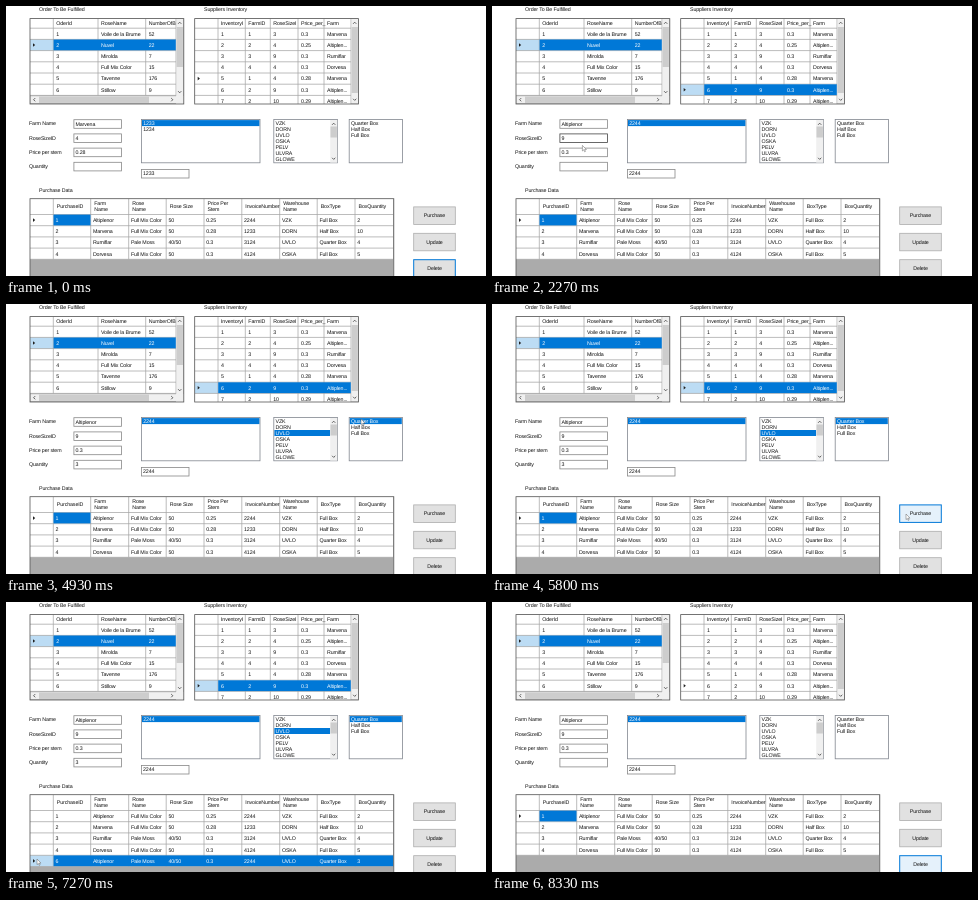
An HTML page that plays this animation: 480x270 px, repeating every 9390 ms.

```html
<!DOCTYPE html>
<html lang="en">
<head>
<meta charset="utf-8">
<title>Rose purchase form</title>
<style>
  html, body { margin: 0; width: 100%; height: 100%; overflow: hidden; background: #fff; }
  svg { display: block; }
  #stage { width: 100vw; height: 100vh; }
  text {
    font: 5.3px "Liberation Sans", Arial, sans-serif;
    letter-spacing: -.12px;
    text-rendering: geometricPrecision;
    white-space: pre;
  }
</style>
</head>
<body>
<svg id="stage" viewBox="0 0 480 270"></svg>
<script>
const LOOP = 9390, FPS = 15, ROW = 11.2;
const BLUE = '#0078d7', INK = '#111', LINE = '#a6a6a6', EDGE = '#555', BOX = '#888';

const orders = [
  [1, 'Voile de la Brume', 52], [2, 'Nuvel', 22], [3, 'Mirolda', 7],
  [4, 'Full Mix Color', 15], [5, 'Tavenne', 176], [6, 'Stillow', 9]
];
const stock = [
  [1, 1, 3, '0.3', 'Marvena'], [2, 2, 4, '0.25', 'Altiplen...'],
  [3, 3, 9, '0.3', 'Rumiflar'], [4, 4, 4, '0.3', 'Dorvesa'],
  [5, 1, 4, '0.28', 'Marvena'], [6, 2, 9, '0.3', 'Altiplen...'],
  [7, 2, 10, '0.29', 'Altiplen...']
];
const purchases = [
  [1, 'Altiplenor', 'Full Mix Color', '50', '0.25', '2244', 'VZK', 'Full Box', 2],
  [2, 'Marvena', 'Full Mix Color', '50', '0.28', '1233', 'DORN', 'Half Box', 10],
  [3, 'Rumiflar', 'Pale Moss', '40/50', '0.3', '3124', 'UVLO', 'Quarter Box', 4],
  [4, 'Dorvesa', 'Full Mix Color', '50', '0.3', '4124', 'OSKA', 'Full Box', 5],
  [6, 'Altiplenor', 'Pale Moss', '40/50', '0.3', '2244', 'UVLO', 'Quarter Box', 3]
];
const depots = ['VZK', 'DORN', 'UVLO', 'OSKA', 'PELV', 'ULVRA', 'GLOWE'];
const boxes = ['Quarter Box', 'Half Box', 'Full Box'];

// Pointer stops: time, x, y
const path = [
  [870, 203, 58.5], [930, 204, 60], [1060, 204, 60], [1130, 205, 70], [1260, 205, 71],
  [1330, 205, 80], [1670, 206, 82], [2270, 90.4, 139.4], [2600, 88, 157], [3130, 90, 160],
  [3600, 265, 134], [3930, 295, 126.5], [4400, 295, 126.5], [4930, 355, 115],
  [5200, 355, 115], [5800, 414, 210], [6130, 415, 211], [6530, 159, 264],
  [7000, 31, 257], [7270, 31, 257], [7600, 330, 276]
];

const rect = (x, y, w, h, fill, stroke = 'none', sw = .8) =>
  `<rect x="${x}" y="${y}" width="${w}" height="${h}" fill="${fill}" stroke="${stroke}" stroke-width="${sw}"/>`;
const line = (x1, y1, x2, y2, color = LINE, w = .75) =>
  `<path d="M${x1} ${y1}L${x2} ${y2}" stroke="${color}" stroke-width="${w}"/>`;
const text = (s, x, mid, fill = INK, anchor = 'start') =>
  `<text x="${x}" y="${mid + 1.8}" fill="${fill}" text-anchor="${anchor}">${s}</text>`;
const chevron = (x, y, turn) =>
  `<path d="M-1.6 .8L0 -.8L1.6 .8" transform="translate(${x} ${y}) rotate(${turn})" fill="none" stroke="#505050" stroke-width=".9"/>`;

function vScroll(x, top, bottom, from, to) {
  return rect(x, top, 7, bottom - top, '#f0f0f0') + rect(x + .3, from, 6.4, to - from, '#cdcdcd') +
    chevron(x + 3.5, top + 4, 0) + chevron(x + 3.5, bottom - 4, 180);
}

function hScroll(y, left, right, from, to) {
  return rect(left, y, right - left, 7, '#f0f0f0') + rect(from, y + .3, to - from, 6.4, '#cdcdcd') +
    chevron(left + 4, y + 3.5, -90) + chevron(right - 4, y + 3.5, 90);
}

function grid(g) {
  const { x, y, w, h, top, cols, heads, rows, right } = g;
  const end = top + rows.length * ROW, first = cols[0];
  let s = rect(x, y, w, h, '#ababab') + rect(x, y, right - x, end - y, '#fff');
  let labels = '', fills = '';
  heads.forEach((head, i) => {
    const parts = head.split('\n'), mid = (y + top) / 2;
    parts.forEach((p, k) => labels += text(p, cols[i] + (g.indent || 3), mid + (k - (parts.length - 1) / 2) * 6));
  });
  rows.forEach((row, i) => {
    const n = i + 1, ry = top + i * ROW, mid = ry + ROW / 2, on = n === g.sel;
    const blueEnd = on ? right : n === g.cell ? cols[1] : first;
    if (blueEnd > first) fills += rect(first + .2, ry + .1, blueEnd - first - .4, ROW - .4, BLUE);
    if (on || n === g.hot) s += rect(x, ry, first - x, ROW, on ? '#bcdcf4' : '#d9ebf9');
    if (n === g.mark) labels += `<path d="M${x + 3} ${mid - 1.8}l2.2 1.8l-2.2 1.8z" fill="#222"/>`;
    row.forEach((v, k) =>
      labels += text(v, cols[k] + (g.pad || 3), mid, on || (n === g.cell && !k) ? '#fff' : INK));
  });
  for (let i = 0; i <= rows.length; i++) s += line(x, top + i * ROW, right, top + i * ROW);
  [...cols, right].forEach(c => s += line(c, y, c, end));
  s += fills + labels + (g.bars || '');
  return `<svg x="${x}" y="${y}" width="${w}" height="${h}" viewBox="${x} ${y} ${w} ${h}">${s}</svg>` +
    rect(x, y, w, h, 'none', EDGE);
}

function list(x, w, items, sel, bar) {
  let s = rect(x, 113.5, w, 43.3, '#fff', '#828790');
  items.forEach((item, i) => {
    const mid = 117.1 + i * 5.95, on = i === sel;
    if (on) s += rect(x + .6, mid - 3, w - (bar ? 8 : 1.2), 6, BLUE);
    s += text(item, x + 1.8, mid, on ? '#fff' : INK);
  });
  if (bar) s += vScroll(x + w - 7.4, 114, 156.6, 120.5, 131.5);
  return s;
}

const field = (x, y, value, border = BOX) =>
  rect(x, y, 47.6, 8.6, '#fff', border) + text(value, x + 1.6, y + 4.2);

function button(label, y, focus, hot) {
  const lit = focus || hot;
  return rect(407.7, y, 41.6, 17.5, hot ? '#e5f1fb' : '#e1e1e1', lit ? BLUE : '#adadad', focus ? 1 : .8) +
    text(label, 428.5, y + 8.7, INK, 'middle');
}

function pointer(t) {
  const i = path.findIndex(p => p[0] > t);
  if (i < 1) return '';
  const [t0, x0, y0] = path[i - 1], [t1, x1, y1] = path[i];
  const k = (t - t0) / (t1 - t0), e = k * k * (3 - 2 * k);
  const x = x0 + (x1 - x0) * e, y = y0 + (y1 - y0) * e;
  return `<path transform="translate(${x} ${y})" d="M0 0V5.6L1.3 4.4L2.2 6.4L3.1 6L2.2 4.1H4Z" fill="#fff" stroke="#555" stroke-width=".45"/>`;
}

function draw(t) {
  const during = (a, b) => t >= a && t < b;
  const chosen = during(7200, 8070);
  const blank = during(6200, 7200);
  const early = t < 1670;
  const typing = during(2670, 4130);
  const farm = blank ? ['', '', '', ''] : early ? ['Marvena', '4', '0.28', '1233'] : ['Altiplenor', '9', '0.3', '2244'];
  const amount = during(3070, 6200) || chosen ? '3' : '';
  const hotStock = during(870, 1130) ? 4 : during(1130, 1330) ? 5 : during(1330, 1530) ? 6 : 0;
  const rows = during(6200, 8070) ? purchases : purchases.slice(0, 4);

  let s = rect(0, 0, 480, 270, '#fff') +
    text('Order To Be Fulfilled', 33, 2.9) + text('Suppliers Inventory', 198, 2.9) + text('Purchase Data', 33, 184.4);

  s += grid({
    x: 24, y: 12.6, w: 153.8, h: 85.4, top: 22.2, right: 170, cols: [47.3, 92, 139.7],
    heads: ['OderId', 'RoseName', 'NumberOfB'], rows: orders, mark: 2, sel: 2,
    bars: rect(170, 90, 8, 8, '#f0f0f0') + vScroll(170.2, 13, 90, 21, 61) + hScroll(90.2, 24.4, 170, 33, 143)
  });
  s += grid({
    x: 188.7, y: 12.6, w: 163.8, h: 85.4, top: 22.2, right: 345, cols: [212, 239.3, 264.3, 292, 318],
    heads: ['InventoryI', 'FarmID', 'RoseSizeI', 'Price_per_', 'Farm'], rows: stock,
    mark: t < 1530 ? 5 : 6, sel: during(1530, 6200) || chosen ? 6 : 0, hot: hotStock,
    bars: vScroll(345.2, 13, 97.6, 21, 87)
  });

  ['Farm Name', 'RoseSizeID', 'Price per stem', 'Quantity'].forEach((label, i) => {
    const y = 113.7 + i * 14.2;
    const border = i === 3 && typing ? BLUE : i === 1 && during(2130, 2330) ? '#444' : BOX;
    s += text(label, 23, y + 3.9) + field(67.9, y, i < 3 ? farm[i] : amount, border);
  });
  if (typing && (t - 2670) % 1060 < 530) {
    const x = amount ? 72.6 : 69.6;
    s += line(x, 157.8, x, 163.3, '#000', .5);
  }

  s += list(135.4, 118.6, early ? ['1233', '1234'] : ['2244'], blank ? -1 : 0) + field(135.4, 163.4, farm[3]);
  s += list(267.8, 63.8, depots, during(4130, 6200) || chosen ? 2 : -1, true);
  s += list(343.2, 53.2, boxes, during(4870, 6200) || chosen ? 0 : -1);

  s += grid({
    x: 24, y: 192.7, w: 363.8, h: 84, top: 208.5, right: 387.5, indent: 3.5, pad: 2.2,
    cols: [47.3, 84.7, 122.7, 160.2, 198, 235.8, 273.7, 311.2, 349],
    heads: ['PurchaseID', 'Farm\nName', 'Rose\nName', 'Rose Size', 'Price Per\nStem', 'InvoiceNumber',
      'Warehouse\nName', 'BoxType', 'BoxQuantity'],
    rows, mark: chosen ? 5 : 1, sel: chosen ? 5 : 0, cell: chosen ? 0 : 1, hot: during(6930, 7200) ? 5 : 0
  });

  const removed = t >= 8070;
  s += button('Purchase', 200.9, during(5600, 7200), during(5600, 6270)) +
    button('Update', 227.3, false, false) +
    button('Delete', 253.7, early || removed, t >= 7800);

  return s + pointer(t);
}

const stage = document.getElementById('stage');
let last = -1;
function tick(now) {
  // Centisecond rounding keeps each step on its displayed time
  const step = Math.floor((now % LOOP + 4) * FPS / 1000);
  if (step !== last) {
    last = step;
    stage.innerHTML = draw(Math.round(step * 100 / FPS) * 10);
  }
  requestAnimationFrame(tick);
}
tick(performance.now());
</script>
</body>
</html>
```
